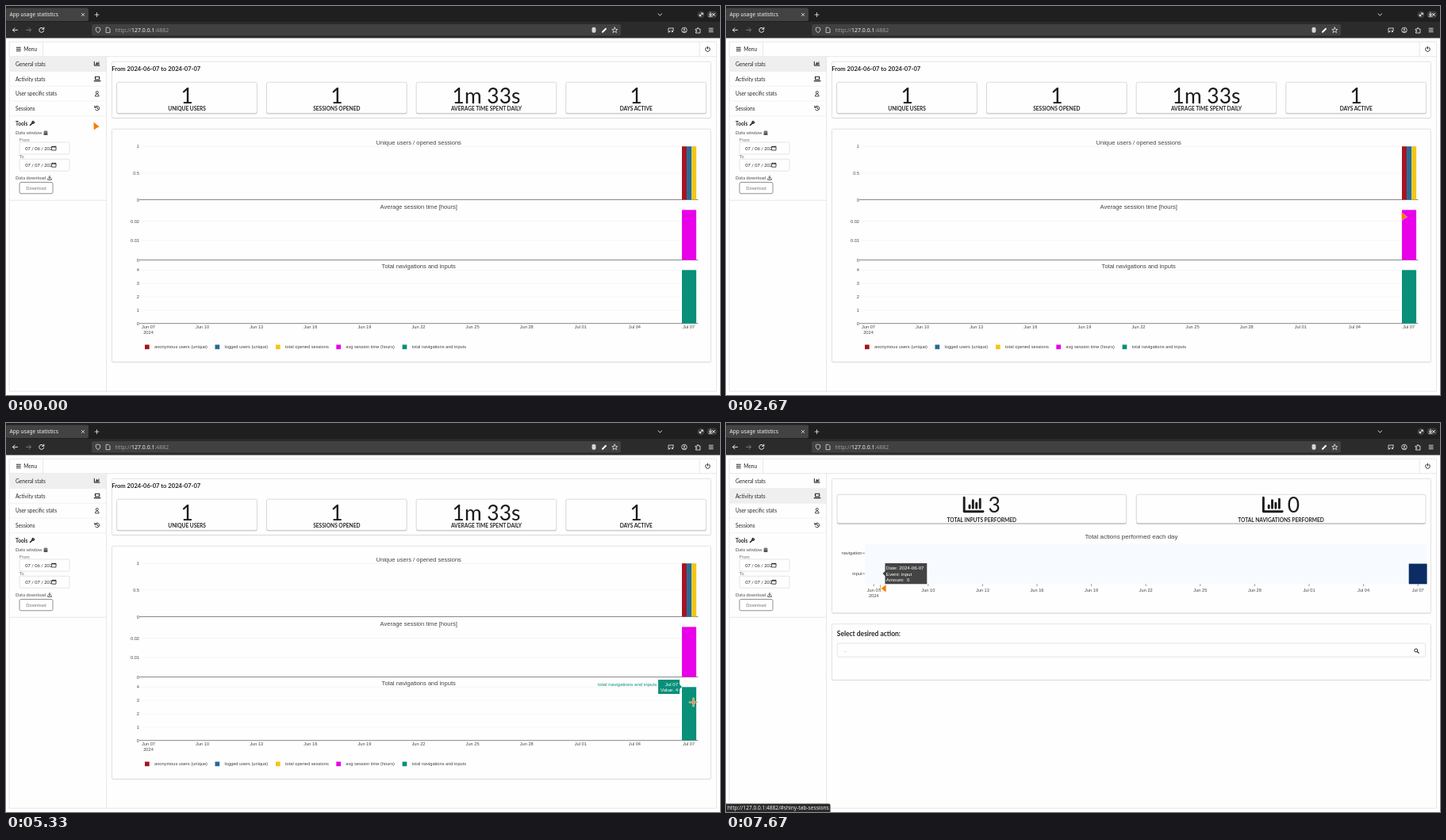
These frames come from a looping animation (900x491 px, 8 s). An HTML page:

```html
<!DOCTYPE html>
<html lang="en">
<head>
<meta charset="utf-8">
<title>App usage statistics</title>
<style>
html, body { margin: 0; width: 100%; height: 100%; overflow: hidden; background: #fefefe; }
svg { display: block; width: 900px; height: 491px; }
text { font: 6.6px Lato, sans-serif; fill: #262626; white-space: pre; }
.b { font-weight: 700; }
.small { font-size: 5.66px; }
.grey { fill: #777; }
.ui { font: 6.6px "Noto Sans", "Open Sans", sans-serif; fill: #f2f2f2; }
.plot text { font: 5.67px "Liberation Sans", Arial, sans-serif; fill: #444; }
.plot .title { font-size: 7.56px; }
.plot .tip { font-size: 6.14px; }
.big { font-size: 26.4px; fill: #1b1c1d; }
.mid { text-anchor: middle; }
.end { text-anchor: end; }
.line { fill: none; stroke-width: 1; stroke-linecap: round; stroke-linejoin: round; }
</style>
</head>
<body>
<svg id="stage" viewBox="0 0 900 491" xmlns="http://www.w3.org/2000/svg"></svg>
<script>
const rect = (x, y, w, h, fill, more = '') =>
  `<rect x="${x}" y="${y}" width="${w}" height="${h}" fill="${fill}" ${more}/>`;
const text = (x, y, s, cls = '', more = '') =>
  `<text x="${x}" y="${y}" class="${cls}" ${more}>${s}</text>`;
const path = (d, stroke, w = 1, more = '') =>
  `<path class="line" d="${d}" stroke="${stroke}" style="stroke-width:${w}" ${more}/>`;
const group = (id, s) => `<g id="${id}">${s}</g>`;
const move = (x, y, s) => `<g transform="translate(${x} ${y})">${s}</g>`;

const RED = '#a31621', BLUE = '#246b9c', YELLOW = '#f2c51a', PINK = '#e800e8', TEAL = '#0a8f79';
const ORANGE = '#f57c00', DARK = '#222', RULE = '#e2e2e2';

const panel = (y, h) =>
  rect(133.5, y + 1, 755, h, '#ddd', 'rx="1.5"') +
  rect(133.5, y, 755, h, '#fefefe', 'rx="1.5" stroke="#dedede" stroke-width=".8"');
const card = (x, y, w, h) =>
  rect(x, y + .9, w, h, '#999', 'rx="2"') +
  rect(x, y, w, h, '#fefefe', 'rx="2" stroke="#d3d3d8" stroke-width=".8"');
const chartIcon = (x, y, k, w) => move(x, y, `<g transform="scale(${k})">` +
  path('M1.2 1V18.5H25', '#1b1c1d', w) +
  path('M8 14V11M12.3 14V4.5M16.7 14V8M21.2 14V3', '#1b1c1d', w, 'stroke-linecap="butt"') + '</g>');

function browser() {
  const light = '#eee';
  return rect(0, 0, 900, 20, '#1f1f1f') + rect(0, 20, 900, 20.5, '#2b2b2b') +
    rect(0, 2.5, 104, 16.5, '#434343', 'rx="2"') + rect(108, 23, 667, 14.5, '#414141', 'rx="2"') +
    text(4.5, 13.3, 'App usage statistics', 'ui') +
    path('M95.3 9.2l3.4 3.4m0-3.4l-3.4 3.4M114.5 8.5v5M112 11h5', light, .8) +
    path('M822 9.8l2.3 2.2 2.3-2.2', light, .9) +
    [888, 876, 892].map(x => `<circle cx="${x}" cy="10.8" r="4.6" fill="#3a3a3a"/>`).join('') +
    path('M888 8v3.5m-1.6-1.2l1.6 1.6 1.6-1.6M886 13h4M874.5 12.5l3.4-3.4M890.5 9.3l3 3m0-3l-3 3', light, 1) +
    path('M876.5 9h1.8v1.8M874.2 10.8v1.8h1.8', light, 1) +
    path('M14.5 30.3H8.5m2.5-2.5l-2.5 2.5 2.5 2.5', light, 1) +
    path('M25.5 30.3h6m-2.5-2.5l2.5 2.5-2.5 2.5', '#777', 1) +
    path('M47.5 29a3 3 0 1 0 .2 2.2M47.8 27v2.2h-2.3', light, 1) +
    path('M116 27l2.7 1v2.2q0 2-2.7 3.5q-2.7-1.5-2.7-3.5V28z', '#ddd', .8) +
    path('M126.5 27.2h2.8l1.8 1.8v4.6h-4.6z', '#ddd', .8) +
    text(137.5, 32.8, '<tspan fill="#9b9b9b">http://</tspan>127.0.0.1<tspan fill="#9b9b9b">:4882</tspan>', 'ui', 'style="font-size:6.95px"') +
    rect(738.5, 26.8, 5, 7, '#d5d5d5', 'rx="2"') +
    path('M752 32.8l4-4', '#fff', 2) +
    path('M767.3 27l1 2.3 2.5.2-1.9 1.6.6 2.5-2.2-1.4-2.2 1.4.6-2.5-1.9-1.6 2.5-.2z', '#eee', .8) +
    path('M841 28h-6v4.5h2M841 28v3M835 33.5l2.5-2.5M839 31l2 2m0-2l-2 2', '#ddd', .9) +
    '<circle cx="855" cy="30.4" r="3.3" fill="none" stroke="#ddd" stroke-width=".9"/>' +
    '<circle cx="855" cy="29.5" r="1.1" fill="#ddd"/>' + path('M853.3 32.3q1.7-1.6 3.4 0', '#ddd', .9) +
    path('M869.5 29h2v-1.3h1.5V29h2v5h-5.5v-1.7h1.2v-1.6h-1.2z', '#ddd', .9) +
    path('M886.2 28.2h5M886.2 30.4h5M886.2 32.6h5', '#eee', .9);
}

function sidebar() {
  const rows = ['General stats', 'Activity stats', 'User specific stats', 'Sessions'];
  const dateBox = (y, d) => rect(17, y, 63, 15, '#fefefe', 'rx="1.5" stroke="#dedede" stroke-width=".8"') +
    text(24.3, y + 9.8, d, 'small', 'clip-path="url(#date)"') +
    path(`M58 ${y + 5.5}h5v4.5h-5zM59.2 ${y + 4.8}v.7M61.8 ${y + 4.8}v.7M58 ${y + 6}h5`, DARK, .8);
  return '<clipPath id="date"><rect x="0" y="0" width="57" height="491"/></clipPath>' +
    path('M4.5 45.3H895.5V486.3H4.5zM4.5 63.7H895.5M126.5 63.7V486M46.5 45.3V63.7M874.3 45.3V63.7M4.5 245.3H126.5', RULE, .8) +
    path('M13.3 52.3h5M13.3 54.5h5M13.3 56.7h5', DARK, 1) + text(22.3, 57, 'Menu') +
    path('M882.9 52.3a2.8 2.8 0 1 0 3.2 0M884.5 51.3v2.8', DARK, 1) +
    rect(5, 64.2, 121, 18.3, '#efefef', 'id="general"') + rect(5, 82.7, 121, 18.4, '#f8f8f8', 'id="activity"') +
    rows.map((s, i) => text(12, 75.8 + i * 18.7, s) + path(`M5 ${82.6 + i * 18.7}h121`, '#ececec', .7)).join('') +
    chartIcon(111, 70, .28, 3.4) +
    path('M112.5 89.2h5.2v3.6h-5.2zM111.2 94.6h7.8', DARK, 1.1) +
    '<circle cx="114.8" cy="109" r="1.5" fill="none" stroke="#222" stroke-width=".8"/>' +
    path('M112.4 113.5q0-2.5 2.4-2.5t2.4 2.5z', DARK, .8) +
    path('M112.3 127.8a2.8 2.8 0 1 1 .3 2.9M111.8 126.2v1.9h2M115 127.6v1.6l1.2.7', DARK, .9) +
    text(12, 150.5, 'Tools', 'b') + path('M30.5 150.5l2.6-2.6M33.2 147.8l-.2-1.5 1.3-.8m-1 2.3l1.5.2.8-1.3', DARK, 1.5) +
    text(12, 162.3, 'Date window', 'b small grey') +
    rect(47.6, 158.2, 4.8, 4.9, '#555', 'rx=".6"') + path('M49 157.5v1M51 157.5v1', '#555', .8) + path('M48 159.7h4', '#ddd', .4) +
    text(16.8, 171, 'From', 'small grey') + dateBox(172, '07 / 06 / 2024') +
    text(16.8, 192.3, 'To', 'small grey') + dateBox(193.2, '07 / 07 / 2024') +
    text(12, 218.9, 'Data download', 'b small grey') +
    path('M55 214.5v3m-1.4-1.3l1.4 1.4 1.4-1.4M52.7 218v1.3h4.6V218', '#555', 1) +
    rect(17, 222.5, 42, 14.3, '#fefefe', 'rx="2" stroke="#777" stroke-width=".8"') +
    text(38, 231.7, 'Download', 'small grey mid');
}

const days = ['Jun 07', 'Jun 10', 'Jun 13', 'Jun 16', 'Jun 19', 'Jun 22', 'Jun 25', 'Jun 28', 'Jul 01', 'Jul 04', 'Jul 07'];
const dates = (x, step, y) => days.map((d, i) => text(x + i * step, y, d, 'mid')).join('') + text(x, y + 7.3, '2024', 'mid');

function subplot(title, titleY, base, ticks) {
  return ticks.map(([s, y]) => (y < base ? path(`M171 ${y}H872`, '#eee', .6) : '') + text(168, y + 2, s, 'end')).join('') +
    path(`M168.5 ${base}H872`, '#555', .7) + text(520.2, titleY, title, 'title mid');
}

function general() {
  const stats = [['1', 'UNIQUE USERS'], ['1', 'SESSIONS OPENED'], ['1m 33s', 'AVERAGE TIME SPENT DAILY'], ['1', 'DAYS ACTIVE']];
  const legend = [[175, RED, 'anonymous users (unique)'], [263.5, BLUE, 'logged users (unique)'],
    [340, YELLOW, 'total opened sessions'], [416.3, PINK, 'avg session time (hours)'], [499.6, TEAL, 'total navigations and inputs']];
  return panel(70.3, 71) + text(133.3, 82.3, 'From 2024-06-07 to 2024-07-07', 'b', 'style="font-size:7.6px"') +
    stats.map(([n, s], i) => {
      const x = 139.7 + i * 188.7;
      return card(x, 96.2, 176.8, 39.2) + text(x + 88.4, 122.7, n, 'big mid') + text(x + 88.4, 132.3, s, 'b mid');
    }).join('') +
    panel(155.3, 294) + '<g class="plot">' +
    subplot('Unique users / opened sessions', 175, 244.5, [['1', 177.3], ['0.5', 211], ['0', 244.5]]) +
    subplot('Average session time [hours]', 255.6, 320.6, [['0.02', 271.5], ['0.01', 296], ['0', 320.6]]) +
    subplot('Total navigations and inputs', 331.2, 400.7, [4, 3, 2, 1, 0].map(n => [n, 400.7 - n * 16.85])) +
    [RED, BLUE, YELLOW].map((c, i) => rect(852 + i * 6.05, 177.2, 6.05, 67.3, c)).join('') +
    rect(852, 257.4, 18.1, 63.2, PINK) + rect(852, 333.3, 18.1, 67.4, TEAL) +
    dates(179.5, 68.1, 407) +
    legend.map(([x, c, s]) => rect(x, 427.5, 5.7, 5.7, c) + text(x + 12, 432.4, s)).join('') + '</g>';
}

const loading = () => panel(70.3, 133.5) + panel(217.7, 37) +
  text(139.8, 233, 'Select desired action:', 'b', 'style="font-size:8.46px"');

function activity() {
  const total = (x, n, s) => card(x, 90.3, 364.8, 36.2) + chartIcon(x + 159, 93.3, 1, 2.9) +
    text(x + 190.5, 113.3, n, 'big') + text(x + 182.3, 124.5, s, 'b mid');
  const tip = ['Date: 2024-06-07', 'Event: input', 'Amount:  0'];
  return panel(70.3, 169.5) + total(140, '3', 'TOTAL INPUTS PERFORMED') + total(517.2, '0', 'TOTAL NAVIGATIONS PERFORMED') +
    '<g class="plot">' + text(511, 145.6, 'Total actions performed each day', 'title mid', 'style="font-size:7.95px"') +
    rect(174.8, 152, 708.8, 51.3, '#f7fbff') + rect(860.7, 177.6, 22.9, 25.7, '#0b2d63') +
    path('M172.5 164.3h2M172.5 190.2h2' + days.map((d, i) => `M${186.2 + i * 68.6} 203.8v1.6`).join(''), '#555', .7) +
    text(171.5, 166.2, 'navigation', 'end') + text(171.5, 192.2, 'input', 'end') + dates(186.2, 68.6, 212.5) +
    '<path d="M197.5 190l3-3v-10h52.8v26.3h-52.8V193z" fill="#444"/>' +
    tip.map((s, i) => text(201.8, 184.8 + i * 7.8, s, 'tip', 'style="fill:#fff"')).join('') + '</g>' +
    panel(253.7, 70.6) + text(139.8, 269, 'Select desired action:', 'b', 'style="font-size:8.46px"') +
    rect(140.2, 278, 741.5, 17.2, '#fefefe', 'rx="2" stroke="#dedede" stroke-width=".8"') +
    text(148, 288.8, '...', '', 'style="fill:#bbb"') +
    '<circle cx="869.8" cy="287" r="2" fill="none" stroke="#222"/>' + path('M871.4 288.6l1.8 1.8', DARK, 1.2);
}

// Chart hover label whose pointer touches (x, cy)
function hover(id, x, cy, color, name, value, ink = '#fff') {
  const r = x - 2.9, l = r - 27;
  return group(id, `<g class="plot"><path d="M${x} ${cy}l-2.9-2.9V${cy - 9}H${l}V${cy + 9}H${r}V${cy + 2.9}z" fill="${color}"/>` +
    text(l - 1.8, cy - 1.4, name, 'tip end', `style="fill:${color}"`) +
    text(r - 2, cy - 1.4, 'Jul 07', 'tip end', `style="fill:${ink}"`) +
    text(r - 2, cy + 6.4, 'Value: ' + value, 'tip end', `style="fill:${ink}"`) + '</g>');
}

const status = (id, w, tab) => group(id, rect(-2, 480.5, w + 2, 14, '#2b2b2b', 'rx="2"') +
  text(1.8, 488.3, 'http://127.0.0.1:4882/#shiny-tab-' + tab, 'ui'));

const shape = d => `<path d="${d}" fill="${ORANGE}" stroke="#fff" stroke-width=".6" paint-order="stroke"/>`;
const cursors = {
  arrow: shape('M.5.5L7.6 6.4L4.6 7.8L.8 10.6z'),
  cross: path('M-4.8 0H4.8M0-4.8V4.8', '#f7e3d0', 2.2) + path('M-4.6 0H4.6M0-4.6V4.6', '#e8852c', 1),
  hand: shape('M1.6.6Q2.6 0 3.2 1V3.6L6.6 4.3Q7.6 4.8 7.4 6L6.8 9.8H2.6L.3 6.4Q.4 5 1.6 5.6z'),
  resize: path('M.6.8V9.2', ORANGE, .8) + shape('M1.8 5L7.6.4V9.6z')
};

document.getElementById('stage').innerHTML = rect(0, 0, 900, 491, '#fefefe') + browser() + sidebar() +
  group('page0', general()) + group('page1', loading()) + group('page2', activity()) +
  hover('red', 852, 177, RED, 'anonymous users (unique)', 1) +
  hover('blue', 858, 177, BLUE, 'logged users (unique)', 1) +
  hover('yellow', 864, 177, YELLOW, 'total opened sessions', 1, '#444') +
  hover('pink', 852, 257.5, PINK, 'avg session time (hours)', 0.0258) +
  hover('teal', 852, 333, TEAL, 'total navigations and inputs', 4) +
  status('link0', 139, 'input_part') + status('link1', 131.5, 'sessions') +
  Object.keys(cursors).map(k => group(k, cursors[k])).join('');

// Pointer stops, three per second: x, y, cursor, hover label
const stops = [
  [110, 146, 'arrow'], [190, 140, 'arrow'], [370, 122, 'arrow'], [542, 113, 'arrow'],
  [593, 132, 'arrow'], [889, 250, 'arrow'], [891.5, 263, 'arrow'], [846, 250, 'arrow'],
  [851, 260, 'arrow'], [856, 225, 'cross', 'red'], [860, 228, 'cross', 'blue'], [860.5, 240.5, 'cross', 'blue'],
  [866, 241.5, 'cross', 'yellow'], [867, 241.5, 'cross'], [867.5, 245, 'cross'], [867, 290, 'cross', 'pink'],
  [866.5, 352.5, 'cross', 'teal'], [866.5, 359.5, 'cross', 'teal'], [42, 68, 'hand'], [28.5, 79.5, 'hand'],
  [32.7, 88, 'hand'], [32.7, 88, 'hand'], [206, 222, 'arrow'], [194, 203.8, 'resize']
];
const el = id => document.getElementById(id);
const show = (id, on) => el(id).setAttribute('visibility', on ? 'visible' : 'hidden');
let last = -1;

function draw() {
  const t = performance.now() % 8000;
  const i = Math.floor((t + 4) * .003) % stops.length;
  if (i !== last) {
    last = i;
    const [x, y, kind, label] = stops[i];
    const page = i < 21 ? 0 : i < 23 ? 1 : 2;
    for (const k in cursors) show(k, k === kind);
    el(kind).setAttribute('transform', `translate(${x} ${y})`);
    for (const k of ['red', 'blue', 'yellow', 'pink', 'teal']) show(k, k === label);
    for (const k of [0, 1, 2]) show('page' + k, k === page);
    show('link0', page === 1);
    show('link1', page === 2);
    show('general', page === 0);
    show('activity', i >= 20);
    el('activity').setAttribute('fill', page ? '#efefef' : '#f8f8f8');
  }
  requestAnimationFrame(draw);
}
draw();
</script>
</body>
</html>
```
